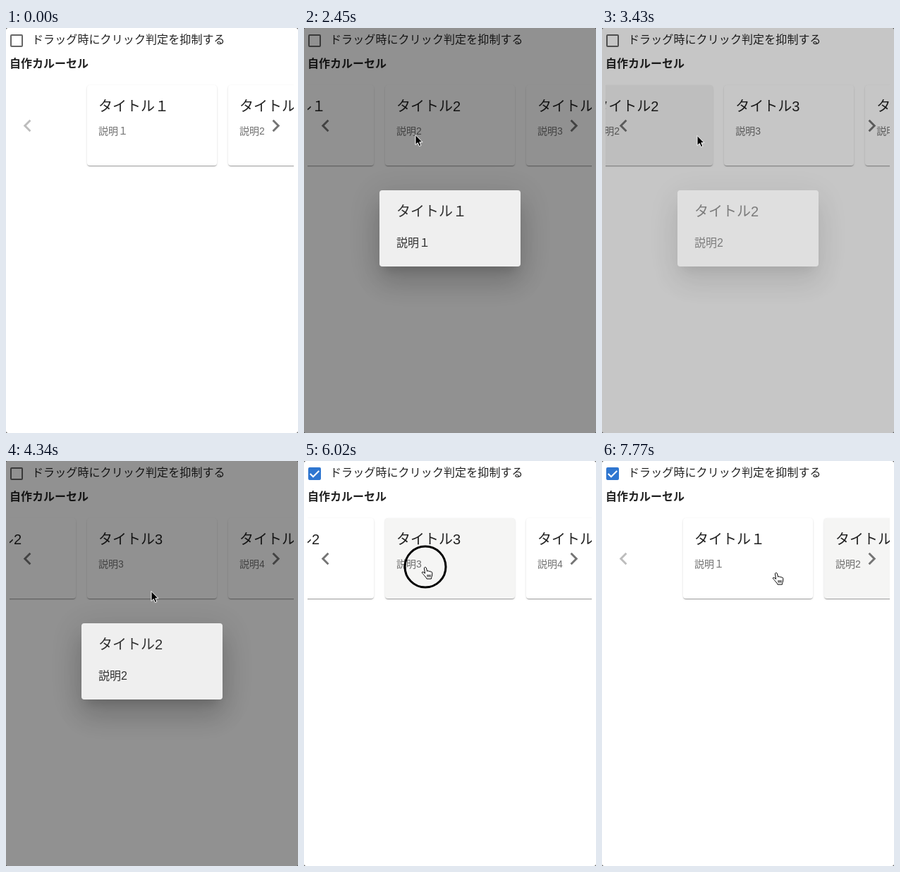
Recreate the animation shown at these times as an HTML page. Size 414x574 px, loop 8000 ms.

```html
<!DOCTYPE html>
<html lang="ja">
<head>
<meta charset="utf-8">
<title>自作カルーセル</title>
<style>
html, body { margin: 0; width: 100%; height: 100%; overflow: hidden; background: #444; }
body { font-family: "Liberation Sans", "Noto Sans CJK JP", sans-serif; color: rgba(0,0,0,.87); }
#stage { position: relative; width: 414px; height: 574px; overflow: hidden; background: #fff; border-radius: 3px; }
#stage div, svg { position: absolute; white-space: nowrap; overflow: visible; }
#stage .label { left: 37px; top: 5px; font-size: 16px; line-height: 24px; letter-spacing: .1px; }
#stage .head { left: 5px; top: 38.5px; font-size: 16px; line-height: 24px; font-weight: 700; }
#stage #view { left: 5px; top: 70px; width: 403px; height: 140px; overflow: hidden; }
.card { top: 11px; width: 184px; height: 114px; border-radius: 4px; background: #fff;
  box-shadow: 0 2px 1px -1px rgba(0,0,0,.2), 0 1px 1px rgba(0,0,0,.14), 0 1px 3px rgba(0,0,0,.12); }
.title { font-size: 20px; line-height: 28px; }
.card .title { left: 16px; top: 16px; }
.card .desc { left: 16px; top: 54.5px; font-size: 14px; line-height: 20px; color: rgba(0,0,0,.56); }
#backdrop { inset: 0; background: rgba(0,0,0,.5); }
#paper { left: 107px; top: 230px; width: 200px; height: 108px; border-radius: 4px; background: #fff;
  box-shadow: 0 11px 15px -7px rgba(0,0,0,.2), 0 24px 38px 3px rgba(0,0,0,.14), 0 9px 46px 8px rgba(0,0,0,.12); }
#paper .title { left: 24px; top: 16px; }
#paper .desc { left: 24px; top: 63px; font-size: 16px; line-height: 24px; }
</style>
</head>
<body>
<div id="stage">
  <svg style="left:3px;top:6px" width="24" height="24">
    <rect id="box" x="4" y="4" width="16" height="16" rx="1" stroke-width="2"/>
    <path id="tick" d="M5.7 12.7 10 17l8.3-8.3" transform="translate(0 -.7)" fill="none" stroke="#fff" stroke-width="2"/>
  </svg>
  <div class="label">ドラッグ時にクリック判定を抑制する</div>
  <div class="head">自作カルーセル</div>
  <div id="view"></div>
  <svg style="left:13.3px;top:120.5px" width="35" height="35" viewBox="0 0 24 24">
    <path id="prev" d="M15.41 7.41 14 6l-6 6 6 6 1.41-1.41L10.83 12z"/>
  </svg>
  <svg style="left:364.7px;top:120.5px" width="35" height="35" viewBox="0 0 24 24">
    <path fill="#757575" d="M10 6 8.59 7.41 13.17 12l-4.58 4.59L10 18l6-6z"/>
  </svg>
  <div id="backdrop"></div>
  <div id="paper"><div class="title"></div><div class="desc"></div></div>
  <svg id="pointer" style="left:0;top:0" width="1" height="1">
    <circle id="ring" fill="none" stroke="#000"/>
    <path id="arrow" stroke="#fff" d="M0 -.5V13.5L3.3 10.6 5.4 15.6 7.9 14.5 5.8 9.7H10Z"/>
    <path id="hand" fill="#fff" stroke="#000" stroke-linejoin="round" d="M-1.6 1.6C-1.3 .2 1 .2 1.4 1.6L2.6 6.3C3.4 5.3 5 5.5 5.3 6.6 6.2 5.8 7.6 6.2 7.8 7.3 8.8 6.8 9.8 7.4 9.8 8.6L9.6 12C9.4 13.6 8.6 14.6 8.4 17H2C1.4 15-1 13-2 11.5-3 10-4.4 9.2-4.7 8.2-4.7 7-3.2 7-2 8L-.4 9.3ZM3 11V14.5M5 11V14.5M7 11V14.5"/>
  </svg>
</div>
<script>
const LOOP = 8000, STEP = 70, PITCH = 200, CLICK = 140, FOCUS = 840;
const $ = id => document.getElementById(id);
const clamp = p => Math.min(1, Math.max(0, p));
const show = (id, on) => $(id).style.display = on ? "" : "none";

function bezier(x1, y1, x2, y2) {
  const at = (a, b, s) => 3 * a * s * (1 - s) ** 2 + 3 * b * s * s * (1 - s) + s ** 3;
  return p => {
    p = clamp(p);
    let lo = 0, hi = 1;
    for (let i = 0; i < 24; i++) {
      const mid = (lo + hi) / 2;
      if (at(x1, x2, mid) < p) lo = mid; else hi = mid;
    }
    return at(y1, y2, hi);
  };
}
const ease = bezier(.25, .1, .25, 1), fade = bezier(.4, 0, .2, 1);

// Pointer moves; a move with a press time drags the carousel
const enter = { x: 206, y: 560 };
const moves = [
  { start: 210, end: 350, x: 205, y: 311 },
  { start: 420, end: 700, x: 210, y: 173 },
  { start: 980, end: 1260, x: 221, y: 153 },
  { press: 1400, start: 1540, end: 1740, x: 158, y: 152 },
  { start: 2590, end: 2940, x: 204, y: 154 },
  { press: 3080, start: 3150, end: 3356, x: 135, y: 153 },
  { start: 3710, end: 3990, x: 214, y: 202 },
  { start: 4060, end: 4130, x: 206, y: 185 },
  { start: 4480, end: 5040, x: 76, y: 22 },
  { start: 5390, end: 5880, x: 172, y: 150 },
  { press: 6020, start: 6230, end: 6460, x: 247, y: 158 },
  { start: 6630, end: 7070, x: 171, y: 150 },
  { press: 7140, start: 7280, end: 7490, x: 247, y: 158 }
];
moves.forEach((m, i) => m.from = moves[i - 1] || enter);

const clicks = [FOCUS, 2310, 4200, 5180];
const checkedAt = clicks.at(-1) + CLICK;
const drags = moves.filter(m => m.press);
// Until the box is checked, every drag also opens a dialog
const dialogs = drags.filter(d => d.end < checkedAt).map((d, i) => ({
  n: i + 1, open: d.end, close: clicks.find(c => c > d.end) + 100
}));

const digit = n => n === 1 ? "１" : n;
function fill(el, n) {
  el.children[0].textContent = "タイトル" + digit(n);
  el.children[1].textContent = "説明" + digit(n);
}
const cards = [1, 2, 3, 4, 5].map(n => {
  const card = $("paper").cloneNode(true);
  card.id = "";
  card.className = "card";
  fill(card, n);
  $("view").append(card);
  return card;
});

const lastMove = t => moves.findLast(m => t >= m.start);

function pointerAt(t) {
  const m = lastMove(t);
  if (!m) return enter;
  const p = clamp((t - m.start) / (m.end - m.start));
  const q = m.press ? p : 1 - (1 - p) ** 2;
  return { x: m.from.x + (m.x - m.from.x) * q, y: m.from.y + (m.y - m.from.y) * q };
}

function scrollAt(t) {
  return drags.reduce((sum, d) => {
    const dist = d.x - d.from.x, rest = Math.sign(dist) * PITCH - dist;
    return sum + dist * clamp((t - d.start) / (d.end - d.start)) + rest * ease((t - d.end) / 230);
  }, 0);
}

// Index of the card under the pointer; a dragged card keeps its hover until the next move
function hoverAt(t) {
  if (t < FOCUS) return -1;
  const m = lastMove(t), held = m.press ? m.start : t;
  const { x, y } = pointerAt(held), dx = x - 115 - scrollAt(held);
  const inside = y > 81 && y < 195 && dx - PITCH * Math.floor(dx / PITCH) < 184;
  return inside ? Math.floor(dx / PITCH) : -1;
}

function draw(t) {
  const scroll = scrollAt(t), { x, y } = pointerAt(t);
  const dialog = dialogs.find(d => t >= d.open && t < d.close + 195);
  const hover = dialog && t > dialog.open + 300 ? -1 : hoverAt(t);

  cards.forEach((card, i) => {
    card.style.left = 110 + PITCH * i + scroll + "px";
    card.style.background = hover === i ? "#f5f5f4" : "#fff";
  });
  const page = drags.reduce((n, d) => n + (t >= d.end ? Math.sign(d.from.x - d.x) : 0), 0);
  $("prev").setAttribute("fill", page ? "#757575" : "#bdbdbd");

  const checked = t >= checkedAt;
  $("box").setAttribute("fill", checked ? "#2f76d0" : "none");
  $("box").setAttribute("stroke", checked ? "#2f76d0" : "#666");
  show("tick", checked);

  const alpha = dialog ? fade((t - dialog.open) / 225) - fade((t - dialog.close) / 195) : 0;
  if (dialog) fill($("paper"), dialog.n);
  $("backdrop").style.opacity = $("paper").style.opacity = alpha;

  const hand = !dialog && (hover >= 0 || y < 38);
  const pressed = clicks.some(c => t >= c && t < c + CLICK) || drags.some(d => t >= d.press && t < d.end);
  $("pointer").style.transform = `translate(${x}px, ${y}px)`;
  show("pointer", t >= moves[0].start);
  show("hand", hand);
  show("arrow", !hand);
  show("ring", pressed);
  $("ring").setAttribute("r", hand ? 29 : 21.3);
  $("ring").setAttribute("stroke-width", hand ? 3 : 2.3);
}

const begin = performance.now();
function tick() {
  const t = (performance.now() - begin) % LOOP;
  draw(Math.floor(t / STEP) * STEP);
  requestAnimationFrame(tick);
}
tick();
</script>
</body>
</html>
```
